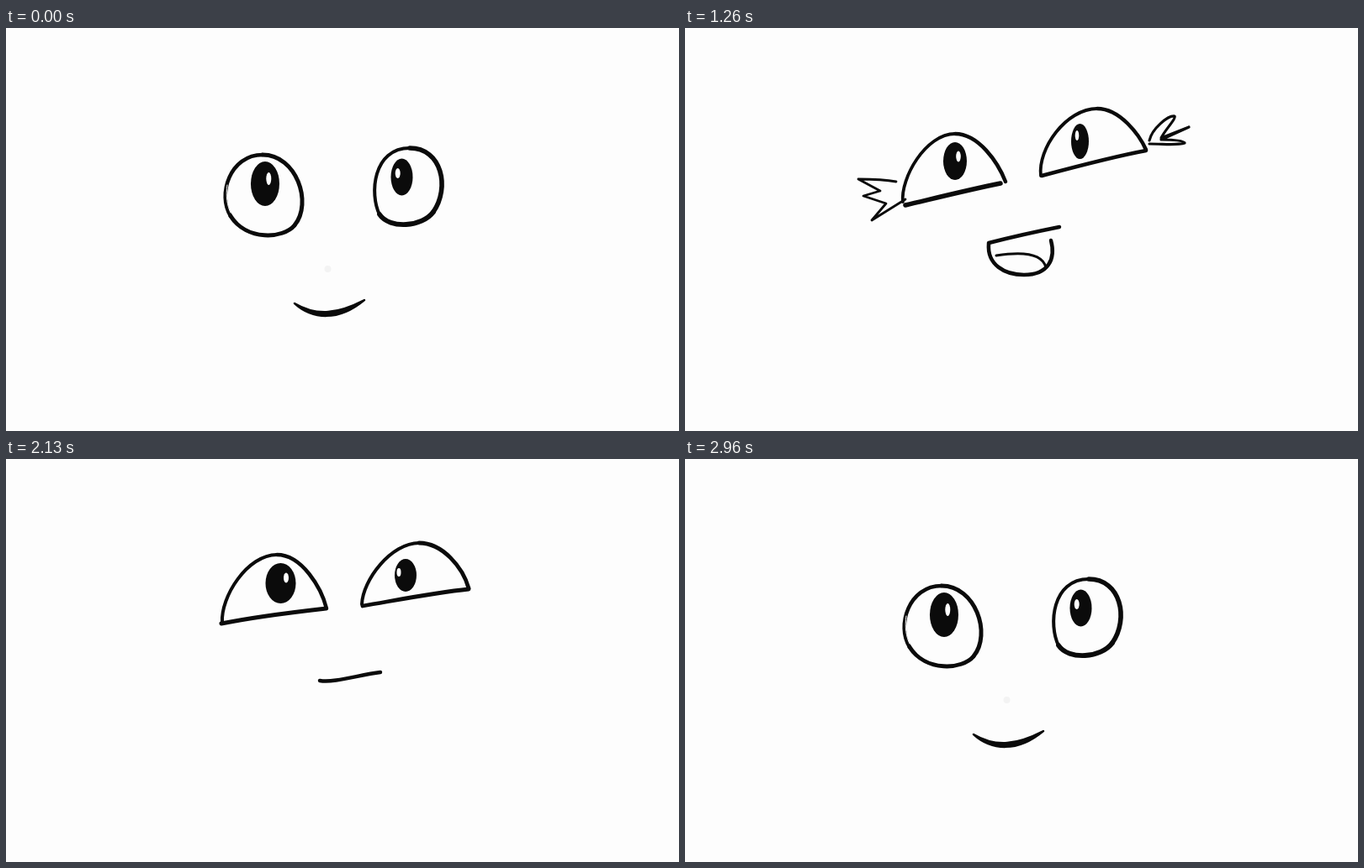
These frames come from a looping animation (800 by 480 pixels, 3 s). An HTML page with a canvas:

```html
<!DOCTYPE html>
<html lang="en">
<head>
<meta charset="utf-8">
<title>Teary face</title>
<style>
html, body { margin: 0; width: 100%; height: 100%; overflow: hidden; background: #fdfdfd; }
canvas { display: block; }
</style>
</head>
<body>
<canvas id="stage" width="800" height="480"></canvas>
<script>
const ctx = document.getElementById('stage').getContext('2d');
const LOOP = 3000;

// Strokes are "path|width" (filled when closed), ellipses are "x y|rx|ry".
const mapPoints = (shape, f) =>
  shape.replace(/(-?[\d.]+) (-?[\d.]+)/g, (_, x, y) => f(+x, +y).join(' '));
const mapPose = (pose, f) =>
  Object.fromEntries(Object.entries(pose).map(([k, s]) => [k, mapPoints(s, f)]));
const shift = (pose, dx, dy) => mapPose(pose, (x, y) => [x + dx, y + dy]);
const widen = (pose, s) => mapPose(pose, (x, y) => [372 + (x - 372) * s, y]);
const collapse = (shape, cx, cy) => mapPoints(shape, () => [cx, cy]).replace(/\|.*/, '|0');

const happy = {
  leftA: 'M267 224C251 199 266 151 305 151|4.5',
  leftB: 'M305 151C345 151 365 208 343 235|5',
  leftC: 'M343 235C330 251 286 254 267 224|5',
  rightA: 'M444 222C432 198 436 143 480 143|4',
  rightB: 'M480 143C518 143 528 190 508 219|5.6',
  rightC: 'M508 219C495 237 456 240 444 222|5.8',
  pupilL: '308 185.5|17|26.5', shineL: '312.3 179.5|3|7.5',
  pupilR: '470.5 177.5|13|22', shineR: '465.7 173|3|6',
  shineEdge: 'M263 187C261 200 263 212 267 220|1',
  nose: '382.5 287|4|4',
  mouth: 'M343 328C364 347 395 350 426 324C395 340 370 344 343 328Z|2.5'
};

const uneasy = {
  leftA: 'M282 237C262 222 271 176 315 175|2.5',
  leftB: 'M315 175C343 176 354 195 355 220|3',
  leftC: 'M355 220C331 225 306 231 282 237|4.5',
  rightA: 'M444 213C436 205 450 166 481 166|3',
  rightB: 'M481 166C503 166 511 190 504 213|4',
  rightC: 'M504 214C485 213 465 214 445 213|4',
  pupilL: '322 200|13|17.5', shineL: '327 198|3|5',
  pupilR: '469.5 192|12|15', shineR: '466 190|3|5',
  lidL: 'M276 229Q314 219 354 208|3.5',
  lidR: 'M443 205Q475 206 505 206|3',
  wave: 'M341 292C365 288 392 285 402 291C410 295 422 287 436 286C448 288 458 285 468 283|3',
  cheekL: 'M330 279C340 289 346 300 340 313C341 301 341 292 330 279Z|1.5',
  cheekR: 'M474 271C468 282 469 293 474 302|2.2'
};

const laugh = {
  leftA: 'M259 207C256 179 286 126 321 126|3.8',
  leftB: 'M321 126C349 126 372 160 381 183|4.5',
  leftC: 'M375 185C340 192 300 202 262 211|5.5',
  rightA: 'M423 176C419 144 453 96 490 96|3.8',
  rightB: 'M490 96C517 96 540 127 548 145|4.5',
  rightC: 'M548 146C510 153 465 165 424 176|4.5',
  pupilL: '321 158.5|14|22.5', shineL: '325 153|2.8|6.5',
  pupilR: '469.5 135|10.5|21', shineR: '466 128|2.3|6',
  lip: 'M361 256Q400 246 445 237|4.5',
  jaw: 'M361 257C359 282 380 294 403 294C432 294 441 275 435 253|4.5',
  tongue: 'M370 271C395 267 424 266 429 285|3',
  burstL: 'M251 183C235 180 220 180 206 180L232 194L212 200L239 209L222 229L262 204|2.8',
  burstR: 'M552 134C555 120 574 104 582 105C584 108 570 122 566 131L599 118L566 133C580 133 592 134 594 137C585 140 570 138 552 138|3.2'
};

const laughWide = {
  ...laugh,
  jaw: 'M361 257C357 290 380 303 403 303C432 303 444 280 437 253|4.5',
  tongue: 'M369 275C395 269 424 270 430 289|3'
};

const calming = {
  ...shift(laugh, -1, -1),
  browL: 'M288 142Q315 136 346 132|3',
  browR: 'M449 115Q480 111 511 101|3',
  lip: 'M362 264Q400 255 440 247|4',
  jaw: 'M362 264C362 271 372 272 385 270C400 268 420 261 441 258|2.6',
  tongue: 'M374 267C390 262 405 260 412 264|2.5',
  burstL: 'M257 188C249 189 242 187 234 187L243 195L229 199L244 204L238 215L257 212|2.8',
  burstR: 'M553 135C558 128 568 114 573 115C575 118 568 124 563 131L578 124L562 133C574 132 580 134 581 136C576 139 566 138 556 139|4.2'
};

const dry = {
  ...calming,
  jaw: 'M362 265C362 270 372 271 385 268C400 265 420 259 440 254|3',
  tongue: 'M374 267C390 264 405 261 412 261|2',
  burstL: collapse(laugh.burstL, 258, 200),
  burstR: collapse(laugh.burstR, 552, 136)
};

const uneasyWide = { ...widen(uneasy, 1.05), burstL: dry.burstL, burstR: dry.burstR };

const flat = {
  leftA: 'M257 195C255 164 287 114 322 114|4',
  leftB: 'M322 114C352 114 375 154 381 178|4.5',
  leftC: 'M380 178C345 182 300 187 256 196|5',
  rightA: 'M423 173C424 144 458 100 491 100|4',
  rightB: 'M491 100C519 100 543 129 550 154|4.8',
  rightC: 'M550 155C510 159 465 168 424 175|4.8',
  pupilL: '326.5 148|18|24', shineL: '333 141.5|3|6',
  pupilR: '475 138.5|13|19.5', shineR: '467 135|2.5|5',
  mouth: 'M373 264C390 267 420 257 445 254C420 257 390 267 373 264Z|4.5'
};

const raised = {
  leftA: 'M261 158C260 129 298 82 330 82|4',
  leftB: 'M330 82C359 82 381 124 385 149|4.5',
  leftC: 'M385 150C345 152 305 153 260 158|5',
  rightA: 'M428 148C431 117 466 80 497 80|4',
  rightB: 'M497 80C526 80 551 111 556 138|4.8',
  rightC: 'M556 138C515 141 470 144 428 149|4.8',
  pupilL: '333 117|18|24', shineL: '340 110|3|6',
  pupilR: '482 117|13|19.5', shineR: '474 114|2.5|5',
  mouth: 'M371 235C385 239 415 232 444 230C415 232 385 239 371 235Z|4.5'
};
const raisedTop = shift(raised, 0, -2);

const keys = [
  [0, happy], [260, widen(uneasy, 0.985)], [433, widen(uneasy, 0.985)], [500, uneasy],
  [760, uneasyWide], [960, uneasyWide], [1244, laugh], [1530, laughWide],
  [1731, calming], [2060, dry], [2130, flat], [2235, flat], [2430, raised],
  [2560, raisedTop], [2800, raisedTop], [2830, shift(raised, 0, -13)], [2960, happy], [LOOP, happy]
];

// Flying drops: outline at DROP_TIME and velocity in px/ms.
const DROP_TIME = 1731;
const drops = [
  ['M613 60C620 48 632 40 641 40C643 42 630 58 621 70|2.2', 0.25, -0.3],
  ['M670 66C680 52 695 44 700 47C705 53 692 64 681 69|2.2', 0.4, -0.3],
  ['M691 131C715 127 728 130 728 135C727 141 710 145 688 143|2.2', 0.55, 0],
  ['M182 180C160 177 138 177 138 182C139 188 160 188 174 187|2', -0.45, 0],
  ['M152 204C138 202 118 207 118 211C120 216 140 211 153 209|2', -0.5, 0.03],
  ['M147 233C135 230 129 240 131 247C140 250 155 241 166 235|2', -0.45, 0.15]
];

// Drawing changes: first time, last time, count.
const steps = [
  [0, 0, 1], [60, 260, 4], [500, 760, 5], [1030, 1530, 8],
  [1600, 2060, 8], [2130, 2130, 1], [2300, 2560, 5], [2830, 2960, 5]
];

function heldTime(t) {
  const [from, to, count] = steps.findLast(s => s[0] <= t);
  const gap = (to - from) / (count - 1) || 1;
  return from + gap * Math.min(count - 1, Math.floor((t - from) / gap + 0.05));
}

function mix(a, b, u) {
  const target = b.match(/-?[\d.]+/g);
  let i = 0;
  return a.replace(/-?[\d.]+/g, n => (+n + (target[i++] - n) * u).toFixed(2));
}

function poseAt(t) {
  const i = Math.max(1, keys.findIndex(k => k[0] >= t));
  const [t0, a] = keys[i - 1], [t1, b] = keys[i];
  const u = (t - t0) / (t1 - t0);
  const pose = {};
  for (const k in { ...a, ...b }) {
    if (a[k] && b[k]) pose[k] = mix(a[k], b[k], u);
    else if (u < 0.5 ? a[k] : b[k]) pose[k] = a[k] || b[k];
  }
  return pose;
}

function draw(shape, color = '#0b0b0b') {
  const [d, w, h] = shape.split('|');
  ctx.fillStyle = ctx.strokeStyle = color;
  if (h) {
    const [x, y] = d.split(' ').map(Number);
    ctx.beginPath();
    ctx.ellipse(x, y, +w, +h, 0, 0, 7);
    ctx.fill();
  } else if (+w > 0.2) {
    const path = new Path2D(d);
    ctx.lineWidth = +w;
    ctx.stroke(path);
    if (d.endsWith('Z')) ctx.fill(path);
  }
}

function frame() {
  const t = heldTime(performance.now() % LOOP);
  ctx.fillStyle = '#fdfdfd';
  ctx.fillRect(0, 0, 800, 480);
  ctx.lineCap = ctx.lineJoin = 'round';
  for (const [name, shape] of Object.entries(poseAt(t)))
    draw(shape, name === 'nose' ? '#f3f3f3' : name.startsWith('shine') ? '#fff' : undefined);
  if (t >= 1600 && t < 2060)
    for (const [shape, vx, vy] of drops)
      draw(mapPoints(shape, (x, y) => [x + vx * (t - DROP_TIME), y + vy * (t - DROP_TIME)]));
  requestAnimationFrame(frame);
}
frame();
</script>
</body>
</html>
```
